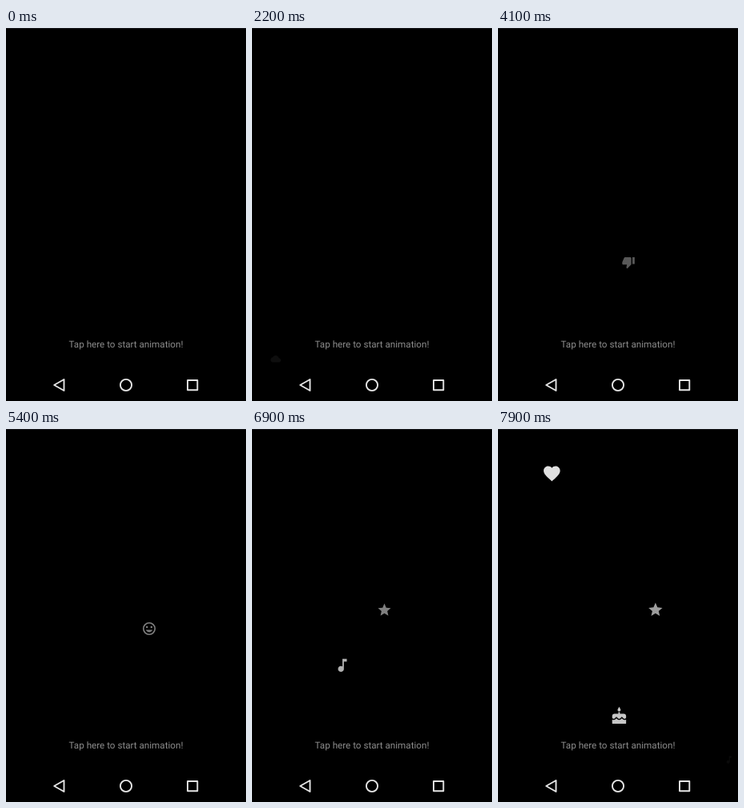
Animation of 300x467 px, one loop 8 s. Source, as an HTML page:

```html
<!DOCTYPE html>
<html lang="en">
<head>
<meta charset="utf-8">
<title>Floating icons</title>
<style>
  html, body { margin: 0; height: 100%; overflow: hidden; background: #000; }
  svg { display: block; width: 100%; height: 100%; }
  text {
    font: 11.67px Roboto, sans-serif; fill: #8c8c8c;
    text-anchor: middle; text-rendering: geometricPrecision;
  }
  .nav { fill: none; stroke: #e4e4e4; stroke-width: 1.9; stroke-linejoin: round; }
</style>
</head>
<body>
<svg viewBox="0 0 300 467">
  <rect width="300" height="1" fill="#16181c"/>
  <text x="150" y="400">Tap here to start animation!</text>
  <svg id="sky" width="300" height="427" fill="#fff" fill-rule="evenodd"></svg>
  <g class="nav">
    <path d="M72.5 440V454L60.2 447Z"/>
    <circle cx="150" cy="447" r="7.1"/>
    <rect x="227" y="441" width="12.3" height="12.3"/>
  </g>
</svg>
<script>
// 24 x 24 icon outlines
const shapes = {
  cloud: 'M19.35 10.04C18.67 6.59 15.64 4 12 4 9.11 4 6.6 5.64 5.35 8.04 2.34 8.36 0 10.91 0 14c0 3.31 2.69 6 6 6h13c2.76 0 5-2.24 5-5 0-2.64-2.05-4.78-4.65-4.96z',
  thumb: 'M15 3H6c-.83 0-1.54.5-1.84 1.22l-3.02 7.05c-.09.23-.14.47-.14.73v2c0 1.1.9 2 2 2h6.31l-.95 4.57-.03.32c0 .41.17.79.44 1.06L9.83 23l6.59-6.59c.36-.36.58-.86.58-1.41V5c0-1.1-.9-2-2-2zm4 0v12h4V3z',
  smile: 'M2 12a10 10 0 1 0 20 0a10 10 0 1 0-20 0zM4 12a8 8 0 1 0 16 0a8 8 0 1 0-16 0zM7 9.5a1.5 1.5 0 1 0 3 0a1.5 1.5 0 1 0-3 0zM14 9.5a1.5 1.5 0 1 0 3 0a1.5 1.5 0 1 0-3 0zM12 17.5c2.33 0 4.31-1.46 5.11-3.5H6.89c.8 2.04 2.78 3.5 5.11 3.5z',
  star: 'M12 17.27L18.18 21l-1.64-7.03L22 9.24l-7.19-.61L12 2 9.19 8.63 2 9.24l5.46 4.73L5.82 21z',
  note: 'M12 3v10.55c-.59-.34-1.27-.55-2-.55-2.21 0-4 1.79-4 4s1.79 4 4 4 4-1.79 4-4V7h4V3z',
  cake: 'M12 6c1.11 0 2-.9 2-2 0-.38-.1-.73-.29-1.03L12 0l-1.71 2.97c-.19.3-.29.65-.29 1.03 0 1.1.9 2 2 2zm4.6 9.99l-1.07-1.07-1.08 1.07c-1.3 1.3-3.58 1.31-4.89 0l-1.07-1.07-1.09 1.07C6.75 16.64 5.88 17 4.96 17c-.73 0-1.4-.23-1.96-.61V21c0 .55.45 1 1 1h16c.55 0 1-.45 1-1v-4.61c-.56.38-1.23.61-1.96.61-.92 0-1.79-.36-2.44-1.01zM18 9h-5V7h-2v2H6c-1.66 0-3 1.34-3 3v1.54c0 1.08.88 1.96 1.96 1.96.52 0 1.02-.2 1.38-.57l2.14-2.13 2.13 2.13c.74.74 2.03.74 2.77 0l2.14-2.13 2.13 2.13c.37.37.86.57 1.38.57 1.08 0 1.96-.88 1.96-1.96V12C21 10.34 19.66 9 18 9z',
  heart: 'M12 21.35l-1.45-1.32C5.4 15.36 2 12.28 2 8.5 2 5.42 4.42 3 7.5 3c1.74 0 3.41.81 4.5 2.09C13.09 3.81 14.76 3 16.5 3 19.58 3 22 5.42 22 8.5c0 3.78-3.4 6.86-8.55 11.54z'
};

// shape, start time, from x, y, to x, y
const flights = [
  ['cloud', 500, 318.5, 4, 13, 438],
  ['thumb', 2900, 95, 14, 199, 441],
  ['smile', 4400, 14, 13, 344, 487],
  ['star', 5900, 30, 148, 301, 305],
  ['note', 6150, 30, 240, 299, 421],
  ['star', 7050, 24, 132, 475, 378],
  ['cake', 7280, 98, 425, 342, 125.5],
  ['heart', 7450, 15, 13, 452, 370]
];

const LOOP = 8000, LIFE = 2000, STEP = 100;
const sky = document.getElementById('sky');
const icons = flights.map(([name]) => {
  const path = document.createElementNS('http://www.w3.org/2000/svg', 'path');
  path.setAttribute('d', shapes[name]);
  return sky.appendChild(path);
});

function draw(now) {
  let t = Math.floor((now % LOOP) / STEP) * STEP;
  if (t > 2200 && t < 2900) t = 2200; // the picture rests here
  flights.forEach(([, start, x0, y0, x1, y1], i) => {
    const u = (t - start) / LIFE;
    const e = (1 - Math.cos(Math.PI * u)) / 2;
    const x = x0 + (x1 - x0) * e, y = y0 + (y1 - y0) * e;
    icons[i].setAttribute('opacity', u >= 0 && u < 1 ? 1 - e : 0);
    icons[i].setAttribute('transform',
      `translate(${x} ${y}) scale(${1.1 - 0.6 * e}) translate(-12 -12)`);
  });
}

const origin = performance.now();
function tick() {
  draw(performance.now() - origin);
  requestAnimationFrame(tick);
}
tick();
</script>
</body>
</html>
```
